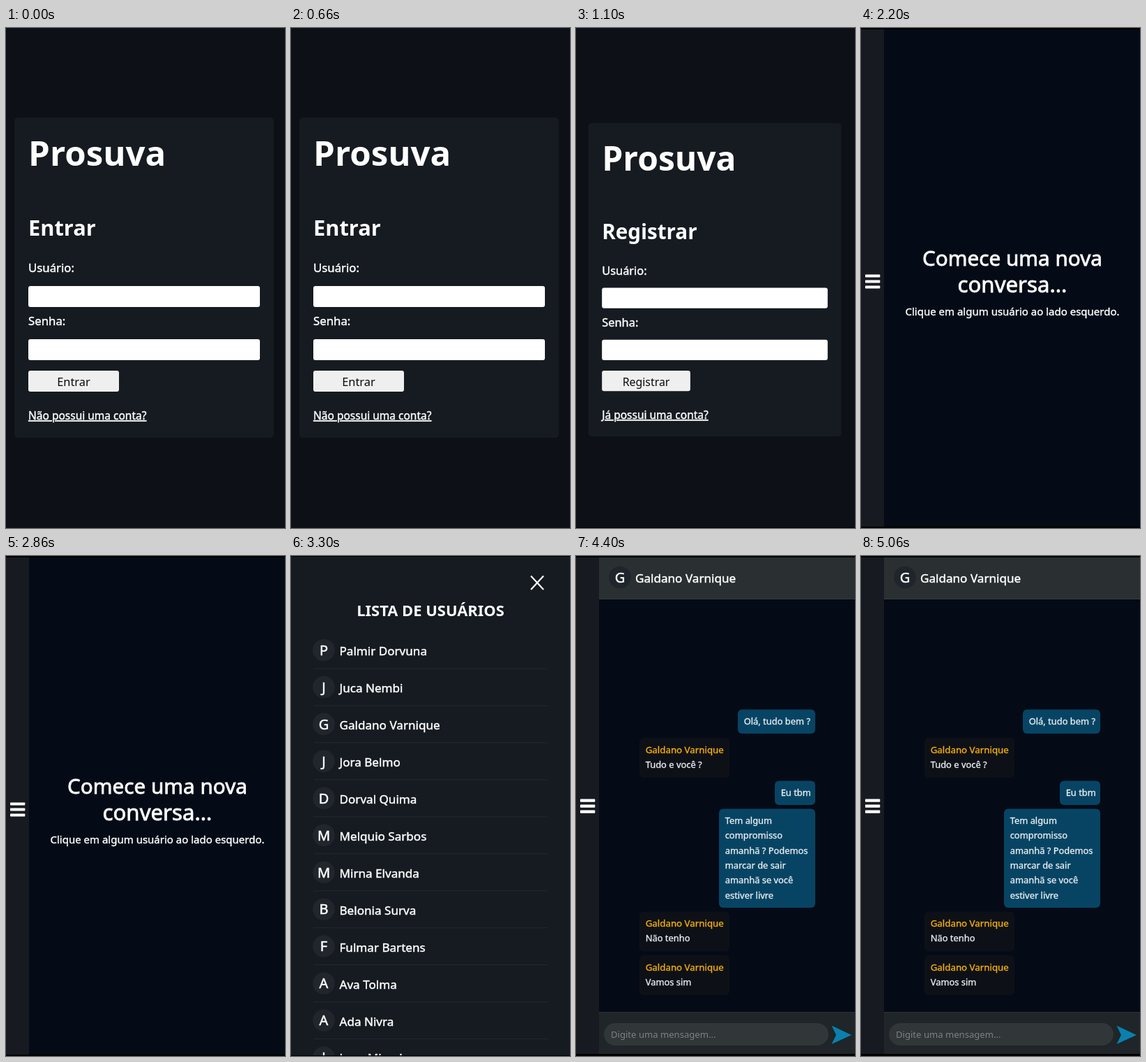
These frames come from a looping animation (400 px wide and 715 px high, 5.5 s). An HTML page:

```html
<!DOCTYPE html>
<html lang="pt-BR">
<head>
<meta charset="utf-8">
<title>Chat</title>
<style>
  html, body { margin: 0; width: 100%; height: 100%; overflow: hidden; background: #0d1117; }
  svg { display: block; width: 100%; height: 100%; font-family: "Noto Sans", "Open Sans", sans-serif; }
</style>
</head>
<body>
<svg id="stage" viewBox="0 0 400 715"></svg>
<script>
const HOLD = 1100;
const WIDTH = 400, HEIGHT = 715;
const PAGE = '#0d1117', PANEL = '#161b21', NIGHT = '#040b16', WHITE = '#fff';
const CONTACT = 'Galdano Varnique';
const USERS = [
  'Palmir Dorvuna', 'Juca Nembi', CONTACT, 'Jora Belmo', 'Dorval Quima', 'Melquio Sarbos',
  'Mirna Elvanda', 'Belonia Surva', 'Fulmar Bartens', 'Ava Tolma', 'Ada Nivra', 'Jono Mirvel'
];

const rect = (x, y, right, bottom, fill, radius = 0) =>
  `<rect x="${x}" y="${y}" width="${right - x}" height="${bottom - y}" rx="${radius}" fill="${fill}"/>`;

// A hairline outline gives the medium weight, which the font lacks.
const text = (content, x, y, size, { weight = 500, fill = WHITE, anchor = 'start', line = 'none' } = {}) =>
  `<text x="${x}" y="${y}" font-size="${size}" font-weight="${weight}" fill="${fill}" ` +
  `stroke="${fill}" stroke-width="${weight === 500 ? size * 0.026 : 0}" ` +
  `text-anchor="${anchor}" text-decoration="${line}">${content}</text>`;

const centered = (content, x, y, size, options = {}) =>
  text(content, x, y, size, { ...options, anchor: 'middle' });

const avatar = (name, x, y, fill) =>
  `<circle cx="${x}" cy="${y}" r="15.8" fill="${fill}"/>` + centered(name[0], x, y + 7.3, 20);

const edges = (top, bottom) =>
  rect(0, 0, WIDTH, top, '#000') + rect(0, bottom, WIDTH, HEIGHT, '#000');

function form({ card, left, right, title, heading, labels, fields, button, link }) {
  const [x, y, cardRight, cardBottom] = card;
  return rect(0, 0, WIDTH, HEIGHT, PAGE)
    + rect(x, y, cardRight, cardBottom, PANEL, 5)
    + text('Prosuva', left, title.y, title.size, { weight: 700 })
    + text(heading.text, left, heading.y, heading.size, { weight: 700 })
    + ['Usuário:', 'Senha:'].map((label, i) => text(label, left, labels.y[i], labels.size)).join('')
    + fields.map(([top, bottom]) => rect(left, top, right, bottom, WHITE, 3)).join('')
    + rect(left, 490, button.right, button.bottom, '#efefef', 3)
    + centered(heading.text, (left + button.right) / 2, 512, button.size, { weight: 400, fill: '#0a0a0a' })
    + text(link.text, left, link.y, 15.5, { line: 'underline' });
}

const login = () => form({
  card: [12, 128, 384, 586], left: 32, right: 364,
  title: { y: 197, size: 49.2 },
  heading: { text: 'Entrar', y: 297, size: 30.8 },
  labels: { y: [349, 425], size: 16.8 },
  fields: [[369, 399], [445, 475]],
  button: { right: 162, bottom: 520, size: 16.4 },
  link: { text: 'Não possui uma conta?', y: 560 }
});

const register = () => form({
  card: [17.7, 136, 380.5, 584], left: 37.2, right: 360.8,
  title: { y: 204, size: 48 },
  heading: { text: 'Registrar', y: 302, size: 29.6 },
  labels: { y: [353, 427], size: 16.4 },
  fields: [[371.4, 400.7], [445.8, 475.1]],
  button: { right: 163.9, bottom: 519.3, size: 15.9 },
  link: { text: 'Já possui uma conta?', y: 559 }
}) + edges(0, 714);

const sidebar = menuY =>
  rect(0, 0, WIDTH, HEIGHT, NIGHT) + rect(0, 0, 33, HEIGHT, '#171b21')
  + [0, 8, 16].map(dy => rect(6, menuY + dy, 27.3, menuY + dy + 4.2, WHITE, 0.8)).join('');

const welcome = () => sidebar(352.4)
  + centered('Comece uma nova', 217, 340, 29.7)
  + centered('conversa...', 217, 378, 31.2)
  + centered('Clique em algum usuário ao lado esquerdo.', 217, 411, 15)
  + edges(2, 713);

function userList() {
  const rowStep = 52.95;
  const rows = USERS.map((name, i) => {
    const y = 134.5 + i * rowStep;
    return avatar(name, 47, y, '#20262c')
      + text(name, 69.5, y + 7.5, 17.1)
      + rect(32, y + 26, 368, y + 27, '#22282f');
  });
  return rect(0, 0, WIDTH, HEIGHT, PANEL)
    + `<path d="M344 28.5 362 48M362 28.5 344 48" stroke="${WHITE}" stroke-width="2.2"/>`
    + centered('LISTA DE USUÁRIOS', 200, 86, 21.9, { weight: 700 })
    + rows.join('')
    + edges(1, 714);
}

function bubble(x, y, right, bottom, lines, sender) {
  const textX = x + 8.7, size = 12.9;
  const first = y + 21.5;
  const body = sender ? first + 21.3 : first;
  return rect(x, y, right, bottom, sender ? PAGE : '#074464', 6)
    + (sender ? text(sender, textX, first, 13.3, { fill: '#f5ad0c' }) : '')
    + lines.map((line, i) => text(line, textX, body + i * 21.3, size, { fill: '#e9eef0' })).join('');
}

const chat = () => sidebar(347.6)
  + rect(33, 0, WIDTH, 61, '#2a2f31') + rect(33, 61, WIDTH, 62, '#363c40')
  + avatar(CONTACT, 63, 30.5, '#1f252c')
  + text(CONTACT, 85, 38, 17.1)
  + bubble(232, 219.5, 343, 254, ['Olá, tudo bem ?'])
  + bubble(91, 260, 220, 317, ['Tudo e você ?'], CONTACT)
  + bubble(285, 321.5, 343, 356, ['Eu tbm'])
  + bubble(205, 361.5, 343, 503, [
    'Tem algum', 'compromisso', 'amanhã ? Podemos',
    'marcar de sair', 'amanhã se você', 'estiver livre'
  ])
  + bubble(91, 508.5, 220, 565.5, ['Não tenho'], CONTACT)
  + bubble(91, 571, 220, 628, ['Vamos sim'], CONTACT)
  + rect(33, 652, WIDTH, HEIGHT, '#1f2528') + rect(33, 652, WIDTH, 653, '#2c3236')
  + rect(40, 668, 362, 700, '#313638', 16)
  + text('Digite uma mensagem...', 50, 689, 13.1, { weight: 400, fill: '#7c8184' })
  + '<path d="M366.5 671.5 395 685 366.5 698 373 685Z" fill="#0a80ae"/>'
  + edges(2, 712);

const stage = document.getElementById('stage');
stage.innerHTML = [login, register, welcome, userList, chat].map(draw => `<g>${draw()}</g>`).join('');
const scenes = [...stage.children];

function render(time) {
  const current = Math.floor(time / HOLD) % scenes.length;
  scenes.forEach((scene, i) => { scene.style.display = i === current ? '' : 'none'; });
}

const start = performance.now();
function tick() {
  render(performance.now() - start);
  requestAnimationFrame(tick);
}
tick();
</script>
</body>
</html>
```
